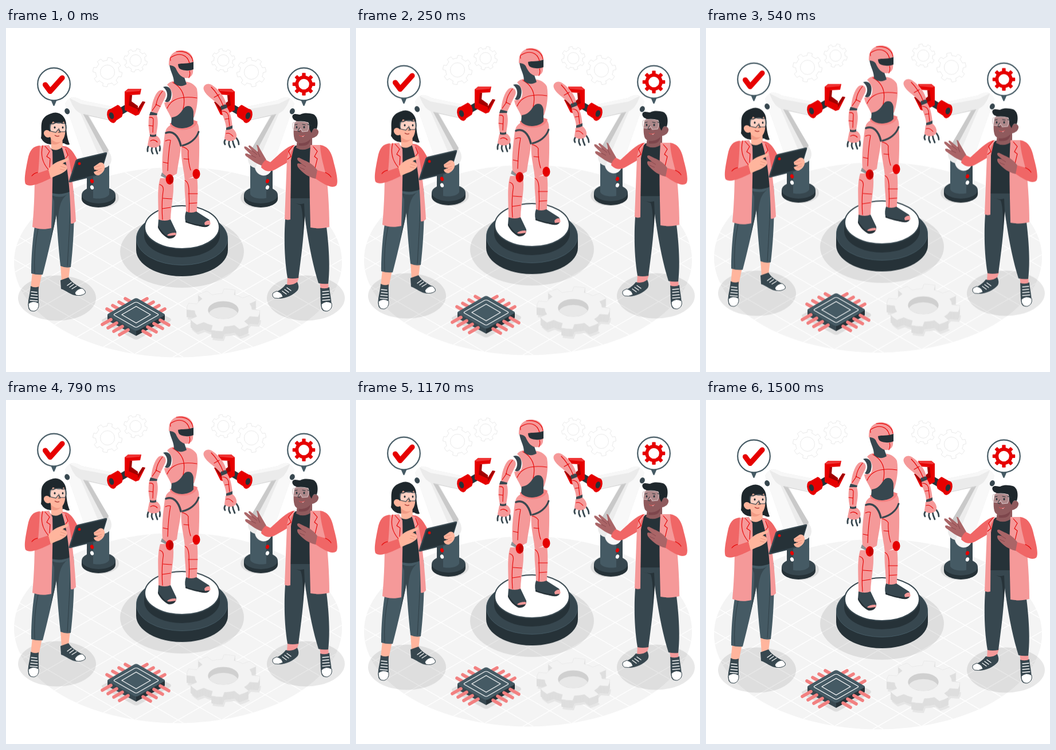
These frames come from a looping animation (600x600 px, 1540 ms). An HTML page:

```html
<!DOCTYPE html>
<html lang="en">
<head>
<meta charset="utf-8">
<title>Robot workshop</title>
<style>
html, body { margin: 0; width: 100%; height: 100%; overflow: hidden; background: #fff; }
svg { display: block; width: 100%; height: 100%; }
#scene { animation: float 1540ms -5ms infinite steps(18, end); }
@keyframes float {
  0% { transform: translateY(0); }
  48.649% { transform: translateY(-11.6px); }
  97.297% { transform: translateY(.4px); }
  97.298%, 100% { transform: translateY(0); }
}
.ink { fill: #263238; } .slate { fill: #37474f; } .steel { fill: #455a64; }
.red { fill: #e60000; } .deep { fill: #a10000; }
.pink { fill: #f59999; } .coral { fill: #f06666; }
.skin { fill: #ffb59d; } .brown { fill: #8f5a5d; } .hand { fill: #aa6567; }
.white { fill: #fff; } .shade { fill: #000; fill-opacity: .09; }
.line { fill: none; stroke: #e60000; stroke-width: 1.1; stroke-linecap: round; }
.dark { fill: none; stroke: #263238; stroke-linecap: round; stroke-linejoin: round; }
.joint { fill: none; stroke: #37474f; stroke-width: 2.8; stroke-linecap: round; }
.lace { fill: none; stroke: #fff; stroke-width: 1.3; stroke-linecap: round; }
.fold { fill: none; stroke: #263238; stroke-width: 1; opacity: .65; }
.pins { fill: none; stroke: #f28080; stroke-width: 5.6; stroke-linecap: round; }
.ghost { fill: #fff; stroke: #e9e9e9; stroke-width: 1; }
</style>
</head>
<body>
<svg viewBox="0 0 600 600">
<defs>
  <pattern id="grid" width="76" height="44" patternUnits="userSpaceOnUse" x="300" y="437">
    <path d="M0 0L76 44M76 0L0 44" stroke="#fff" stroke-width="1.4"/>
  </pattern>
  <g id="arm">
    <ellipse class="shade" cx="164" cy="296" rx="33" ry="18"/>
    <path class="ink" d="M132 291v7a29.500 15 0 0 0 59 0v-7z"/>
    <ellipse class="slate" cx="161.500" cy="291" rx="29.500" ry="15"/>
    <path class="steel" d="M141 232C141 221 180 221 180 232V290C176 300 145 300 141 290Z"/>
    <path class="slate" d="M141 232C142 226 147 224 152 224V297C147 296 143 294 141 290Z"/>
    <ellipse class="red" cx="150" cy="267" rx="3" ry="3.800" transform="rotate(-20 150 267)"/>
    <ellipse class="white" cx="150" cy="278" rx="3" ry="3.800" transform="rotate(-20 150 278)"/>
    <path d="M103 132C109 120 122 119 130 126L182 220C187 231 182 242 172 244C168 262 146 261 143 246Z" fill="#ececec"/>
    <path d="M103 132C107 123 112 121 118 121L171 244C166 260 146 261 143 246Z" fill="#f8f8f8"/>
    <path d="M133 147L141 149L179 213L174 224Z" fill="#c9c9c9"/>
    <path d="M111 123C116 119 123 121 132 126L185 137L186 161L134 150C125 148 118 142 111 123Z" fill="#ebebeb"/>
    <path d="M112 123C117 119 123 121 132 126L185 137L184 142L130 132Z" fill="#f7f7f7"/>
    <path d="M136 150L180 160L186 155L180 161L134 151Z" fill="#d5d5d5"/>
    <ellipse class="slate" cx="106.500" cy="145.500" rx="4.300" ry="5.300" transform="rotate(-25 106 145)"/>
    <path class="ink" d="M194 142L211 132L218 142L199 153Z"/>
    <path class="red" d="M181 142L195 134C202 137 206 147 202 155L187 165Z"/>
    <ellipse class="red" cx="184.500" cy="153.500" rx="7.800" ry="12.500" transform="rotate(-18 184.500 153.500)"/>
    <ellipse class="ink" cx="184" cy="153" rx="4" ry="6" transform="rotate(-18 184 153)"/>
    <path class="red" d="M207 111L213 106L236 106L234 116L216 117L216 133L230 140L238 128L243 129L232 151L226 153L207 143Z"/>
    <path class="deep" d="M216 117L220 117L219 128L230 136L230 142L214 135ZM230 141L238 128L243 129L230 147Z"/>
    <path d="M207 111L213 106L236 106L233 110L211 112Z" fill="#f03434"/>
  </g>
  <g id="shell">
    <circle cx="0" cy="0" r="28.300" fill="#fff" stroke="#455a64" stroke-width="2.200"/>
    <path class="steel" d="M-5.500 27Q0 29.500 5.500 27L1.200 37Q0 39-1.200 37Z"/>
  </g>
</defs>

<g id="scene">
  <!-- floor -->
  <ellipse cx="300" cy="408.500" rx="286" ry="166" fill="#f4f4f4"/>
  <ellipse cx="300" cy="408.500" rx="286" ry="166" fill="url(#grid)"/>
  <g id="ghosts" class="ghost"></g>
  <g class="shade">
    <ellipse cx="89" cy="471" rx="68" ry="39.500"/>
    <ellipse cx="523" cy="471" rx="68" ry="39.500"/>
    <ellipse cx="307" cy="390" rx="108" ry="63"/>
    <path d="M167 509L222 478Q227 475 232 478L286 506Q290 509 286 512L232 542Q227 545 222 542L168 513Z"/>
  </g>

  <use href="#arm"/>
  <use href="#arm" transform="translate(606) scale(-1 1)"/>

  <!-- platform -->
  <path class="ink" d="M227 367V387A80 46 0 0 0 387 387V367Z"/>
  <ellipse class="slate" cx="307" cy="367" rx="79.500" ry="46.500" stroke="#455a64"/>
  <path class="ink" d="M241 348V362A66 38 0 0 0 373 362V348Z"/>
  <ellipse class="white" cx="307" cy="347.500" rx="65" ry="37.500" stroke="#37474f" stroke-width="2"/>

  <!-- chip -->
  <path class="pins" d="M176 490l14 8M186 484l14 8M197 478l14 8M208 472l14 8M277 490l-14 8M267 484l-14 8M257 478l-14 8M246 472l-14 8"/>
  <path class="slate" d="M177 500V508Q177 510 179 511L227 537V520Z"/>
  <path class="ink" d="M277 500V508Q277 510 275 511L227 537V520Z"/>
  <path class="pins" d="M168 517l15-8.500M178 523l15-8.500M188 529l15-8.500M198 535l15-8.500M284 518l-15-8.500M273 524l-15-8.500M262 530l-15-8.500M252 536l-13-7.500"/>
  <path class="steel" d="M179 498L223 472.500Q227 470 231 472.500L275 498Q279 500 275 502L231 527Q227 529 223 527L179 502Q175 500 179 498Z"/>
  <path d="M189 499L224 479Q227 477.500 230 479L265 499Q266.500 500 265 501L230 521Q227 523 224 521L189 501Q187.500 500 189 499ZM202 500L227 485.500L252 500L227 514.500Z" fill="none" stroke="#fff" stroke-width="1.100"/>

  <g id="cog"></g>

  <!-- robot legs -->
  <path class="pink" d="M312 264C310 282 314 300 314 323L333 323C333 303 336 280 333 260Z"/>
  <path class="pink" d="M306 200C304 220 308 238 310 251L336 250C337 230 338 200 336 180Z"/>
  <path class="pink" d="M310 250L327 249L327 259L312 266Z"/>
  <ellipse class="red" cx="332" cy="254.500" rx="6.500" ry="8.700"/>
  <path class="slate" d="M314 320Q323 324 332 320L354 334C358 340 356 347 346 347C333 345 321 341 313 337Q311 328 314 320Z"/>
  <path class="pink" d="M346 340Q350 335 355 336Q358 341 355 344L347 344Z"/>
  <path class="ink" d="M313 336C323 341 334 343 346 344L355 343Q353 348 344 347C333 345 321 342 313 339Z"/>
  <path class="pink" d="M269 262C263 280 266 308 266 336L287 336C287 310 295 287 291 262Z"/>
  <path class="pink" d="M277 184C274 208 271 232 273 253L282 263L298 254C300 236 305 218 305 202L296 182Z"/>
  <path class="ink" d="M272 252L283 262L282 264L270 258Z" opacity=".5"/>
  <ellipse class="red" cx="285.500" cy="264" rx="6.800" ry="9"/>
  <ellipse cx="288" cy="264" rx="4" ry="7" fill="#c40000"/>
  <path class="slate" d="M266 334Q277 338 287 334L297 355C298 363 292 367 283 366C275 362 268 353 265 347Z"/>
  <path class="pink" d="M281 362Q283 357 296 357Q298 362 294 364Z"/>
  <path class="ink" d="M265 345C272 354 275 360 283 363L296 361Q293 368 283 367C275 363 268 355 265 348Z"/>
  <path class="line" d="M278 197Q284 194 287 196Q283 216 282 249M274 234L283 236M268 273Q276 275 274 285Q271 306 273 334M274 297L289 298M273 315L287 313M307 207Q315 209 318 214Q317 232 322 248M310 228L319 229M312 266Q320 269 319 290Q320 307 319 321M318 289L334 289M319 306L333 305"/>

  <!-- robot body -->
  <path class="pink" d="M286 170C279 174 277 181 278 187C290 190 300 196 305 207C312 207 329 199 336 182C338 174 335 166 331 162Z"/>
  <path class="joint" d="M279 183C291 178 301 188 305 205" style="stroke-width:3.500"/>
  <path class="joint" d="M308 205C320 202 332 194 336 181" style="stroke-width:3"/>
  <path d="M286 166C284 181 330 183 334 163L326 160Z" fill="#f58080"/>
  <path class="pink" d="M281 99C285 93 296 90 303 94C316 91 329 97 333 106C336 122 333 141 328 156L289 160C286 149 277 140 276 130L287 128C293 118 290 108 281 99Z"/>
  <path class="slate" d="M289 156C299 155 305 148 309 141C314 134 325 133 327 146V167C319 177 296 178 288 167Z"/>
  <path class="slate" d="M274 103C284 99 291 108 288 121C287 128 282 131 277 128C283 120 283 110 274 103Z"/>
  <path class="line" d="M291 95C309 105 314 120 309 141M281 140C289 121 312 119 333 122"/>

  <!-- robot head -->
  <path class="slate" d="M285 63C286 76 293 83 293 96C300 103 309 102 315 98L311 86L300 62Z"/>
  <path class="pink" d="M284 65C283 47 293 39 306 39C320 39 328 49 327 62L326 78C324 87 315 89 309 86C301 82 298 74 296 70C293 66 288 65 284 65Z"/>
  <path class="ink" d="M300 63C307 61 317 63 327 59V72C318 76 306 74 302 70Q300 67 300 63Z"/>
  <path class="line" d="M288 51C302 42 316 46 320 61M297 41C313 39 324 46 326 58M287 57Q286 51 288 51M320 75Q322 81 319 87"/>

  <!-- robot arms -->
  <path class="pink" d="M266 110C273 105 281 111 278 120L264 149L253 147C254 132 259 116 266 110Z"/>
  <path class="slate" d="M252 146L264 149L263 153L250 152Z"/>
  <path class="pink" d="M250 152H263C267 165 263 178 262 187H251C248 173 248 161 250 152Z"/>
  <path class="joint" d="M252 203Q246 206 247 215M256 206Q252 213 256 219M261 206Q261 213 264 219M266 202Q270 207 268 214"/>
  <path class="pink" d="M250 189L263 188C270 193 271 200 268 205C261 211 250 209 247 204Z"/>
  <path class="slate" d="M251 185Q256 188 262 185V189Q256 191 251 189Z"/>
  <path class="line" d="M273 110Q263 122 262 134L255 144M261 133L269 137M250 156Q257 155 257 160L256 182M249 170L256 171M252 197Q258 193 264 199"/>
  <path class="pink" d="M345 108C342 99 353 94 360 100C373 109 382 121 384 133L374 138C365 126 349 119 345 108Z"/>
  <path class="slate" d="M374 137Q380 132 385 134L386 140L376 143Z"/>
  <path class="pink" d="M376 143L386 139C393 151 394 164 395 172L384 175C384 164 377 154 376 143Z"/>
  <path class="joint" d="M384 193Q379 198 382 203M390 195Q387 202 391 208M395 195Q396 202 399 208M400 190Q406 196 406 203"/>
  <path class="pink" d="M383 178L395 175C401 180 404 187 401 193C395 199 385 198 381 193Z"/>
  <path class="slate" d="M384 174L395 170V175Q389 178 384 178Z"/>
  <path class="line" d="M358 103Q371 116 379 136M363 121L372 116M377 145Q386 145 388 153L390 171M382 159L389 158M384 184Q390 182 396 189"/>

  <!-- woman -->
  <path class="skin" d="M46 425L63 427L57 456L43 455ZM95 412L112 414L109 438L97 443Z"/>
  <path class="slate" d="M43 450Q50 454 57 451C56 467 59 479 55 488C51 496 41 496 39 488C37 477 42 465 43 450Z"/>
  <path class="white" d="M39 481Q47 474 57 480Q58 492 49 494Q39 495 39 481Z" stroke="#37474f"/>
  <path class="lace" d="M44 460l10 1M44 465l11 1M43 470l12 1M42 475l13 1"/>
  <path class="slate" d="M95 440L109 435C115 446 129 451 138 458C140 464 133 467 124 467C113 466 105 458 96 455Z"/>
  <path class="white" d="M120 462Q125 454 133 454Q140 459 138 463Q131 468 122 466Z" stroke="#37474f"/>
  <path class="lace" d="M107 449l7-5M111 452l7-5M115 455l8-5"/>
  <path class="steel" d="M79 286L118 284C120 325 118 374 113 417Q104 419 95 415C92 387 89 352 88 325C81 360 72 400 64 430Q53 431 44 428C44 396 47 365 50 346Z"/>
  <path class="slate" d="M80 292Q97 298 107 290C95 300 92 310 90 346L88 325C86 337 82 354 76 378C82 349 85 320 84 302Z"/>
  <path class="fold" d="M113 291Q112 330 107 415M56 350Q48 388 50 428"/>
  <path d="M61 192C63 182 60 172 63 162C68 151 77 150 82 148C93 145 104 154 105 167C105 183 107 193 111 203Q107 205 101 201L78 203Q67 203 61 192Z" fill="#1e272c"/>
  <path class="ink" d="M77 210L97 207C106 222 110 250 112 285Q97 292 80 288Z"/>
  <path class="skin" d="M78 188H98L99 207Q89 216 79 211Z"/>
  <path d="M79 194L96 198Q88 206 79 202Z" fill="#f29c86"/>
  <path class="skin" d="M77 181C71 174 63 180 67 187Q71 193 77 190C80 199 94 203 99 195C104 189 105 174 101 163C94 170 86 166 82 163C78 168 78 174 77 181Z"/>
  <path d="M77 168Q91 162 104 167Q107 174 103 181L94 181L91 177L87 182L78 180Q75 174 77 168Z" fill="#fff" fill-opacity=".4" stroke="#37474f" stroke-width="1.200"/>
  <path class="dark" d="M81 168l5-2M96 166l4 1M92 175l3 7l-4 0" stroke-width="1"/>
  <ellipse class="ink" cx="85" cy="173.500" rx="1.500" ry="2"/><ellipse class="ink" cx="99" cy="173.500" rx="1.400" ry="2"/>
  <path d="M85 187Q89 190 93 188" fill="none" stroke="#a5322e" stroke-width="1.200"/>
  <path class="coral" d="M98 206C112 205 119 219 126 232L121 255L111 251Z"/>
  <path class="pink" d="M97 206L106 211C113 235 119 285 122 337Q118 342 113 341C112 298 111 249 97 206Z"/>
  <path class="pink" d="M75 204L81 215C82 240 81 290 79 349C67 352 55 351 46 347C49 315 50 285 50 255L56 206Z"/>
  <path class="coral" d="M59 205C47 206 41 213 38 229C34 249 31 265 34 272C41 279 60 271 78 262L74 247L56 253C58 236 58 219 59 205Z"/>
  <path class="line" d="M68 206L76 215L71 224L77 228L76 243M104 211L108 222L104 227M55 252Q49 253 45 258M64 205Q58 229 74 247"/>
  <path class="slate" d="M126 228L173 217Q177 216 176 220L166 253Q165 256 161 257L113 269Q108 270 110 266L121 232Q122 229 126 228Z"/>
  <path class="ink" d="M127 230L172 219.500Q175 219 174 222L165 251Q164 254 160 255L116 266Q112 267 113 264L123 234Q124 231 127 230Z"/>
  <circle class="red" cx="128" cy="236.500" r="2.500"/>
  <path class="skin" d="M74 247C80 238 87 234 96 231L107 227Q111 228 107 232L99 236L105 239Q108 244 105 248C98 255 89 256 78 262Z"/>
  <path d="M98 237l7 3M95 241l9 3M94 246l8 2" fill="none" stroke="#eb9481" stroke-width="1"/>
  <path class="skin" d="M153 242L163 235Q170 233 172 241C173 249 168 253 162 257Q154 257 153 251L161 248L154 247Z"/>
  <path d="M155 243l10-3M157 248l10-3M159 252l8-3" fill="none" stroke="#eb9481" stroke-width="1"/>

  <!-- man -->
  <path class="pink" d="M491 434L511 434L507 447L490 450ZM547 443L562 443L563 456L549 457Z"/>
  <path class="slate" d="M488 447Q499 450 508 443Q512 451 509 457C502 465 490 472 475 472C467 472 463 468 466 463C475 459 483 454 488 447Z"/>
  <path class="white" d="M466 462L472 459Q481 461 483 469Q475 473 468 471Q463 467 466 462Z" stroke="#37474f"/>
  <path class="lace" d="M490 453l7 5M486 456l7 5M482 459l7 5"/>
  <path class="slate" d="M548 453Q557 456 564 452C565 466 569 477 567 486C564 496 552 497 550 488C548 477 549 466 548 453Z"/>
  <path class="white" d="M550 482Q558 474 568 480Q570 491 560 494Q550 494 550 482Z" stroke="#37474f"/>
  <path class="lace" d="M552 460l11-1M552 465l11-1M552 470l12-1M552 475l13-1"/>
  <path class="slate" d="M496 294H534L559 347C564 387 565 420 562 446Q553 447 545 445C534 410 527 371 521 328C519 370 514 405 510 436Q499 438 491 436C485 400 485 362 487 333Z"/>
  <path class="ink" d="M500 304Q510 309 520 306L521 330L517 365C519 335 517 317 514 309Z"/>
  <path class="ink" d="M497 213L505 205H531L535 297H496Z"/>
  <path class="brown" d="M509 190H534V206Q520 217 506 209Z"/>
  <path d="M511 200Q522 202 531 194Q529 208 510 205Z" fill="#7d464c"/>
  <path class="brown" d="M503 166C501 179 501 189 504 196C510 204 524 202 532 192C539 193 546 186 545 180C543 174 537 174 534 179L535 163L510 158Z"/>
  <path d="M500 152C503 148 509 151 513 151C521 147 530 149 535 150C544 153 545 166 542 176C536 173 534 180 533 183C527 176 530 168 526 164C518 164 508 164 502 160Q498 156 500 152Z" fill="#1e272c"/>
  <path d="M501 165Q514 161 527 165Q530 172 526 180L517 181L514 176L510 179L502 178Q498 172 501 165Z" fill="#fff" fill-opacity=".28" stroke="#d9c4c6" stroke-width="1.100"/>
  <path class="dark" d="M504 169l4-1M517 168l5 1M512 174l-3 6l4 1M526 168l7 2" stroke-width="1"/>
  <ellipse class="ink" cx="507" cy="173" rx="1.400" ry="2"/><ellipse class="ink" cx="520" cy="173" rx="1.500" ry="2"/>
  <path d="M513 187Q517 190 521 187L518 190Z" fill="#fff"/><path d="M511 187Q516 191 521 187" fill="none" stroke="#e65050"/>
  <path class="hand" d="M450 241C439 239 428 230 418 223Q415 218 421 219L428 222L416 210Q414 205 419 207L429 214L423 207Q423 203 427 206L439 216Q439 209 437 204Q439 202 443 211L454 230Z"/>
  <path d="M428 222l8 4M429 214l9 7M439 216l4 9" fill="none" stroke="#89494f"/>
  <path class="coral" d="M503 204C489 206 475 222 461 234L453 230Q446 236 445 243C453 252 463 251 471 246L497 231Z"/>
  <path class="pink" d="M505 203L497 217L496 334Q490 336 486 333L490 230C492 217 496 207 505 203Z"/>
  <path class="pink" d="M531 204L548 204L558 245C562 284 564 318 564 347C553 350 541 350 531 348C530 302 528 247 531 204Z"/>
  <path class="coral" d="M548 204C561 206 568 215 572 236C577 254 580 270 576 275C568 281 554 272 539 262L543 248L557 252C553 236 548 219 548 204Z"/>
  <path class="line" d="M501 205L493 215L497 224L491 229M536 207L543 215L538 224L543 228L535 261M557 252Q564 255 567 260"/>
  <path class="hand" d="M543 248C536 238 528 234 521 231L511 226Q506 226 509 231L516 237L509 236Q506 239 511 245C520 255 528 260 540 263Z"/>
  <path d="M515 237l8 5M512 243l9 4" fill="none" stroke="#89494f"/>

  <!-- bubbles -->
  <use href="#shell" x="83.500" y="98"/>
  <path d="M68.500 99L77 110.500L98 87" fill="none" stroke="#e60000" stroke-width="9.200" stroke-linecap="round" stroke-linejoin="round"/>
  <use href="#shell" x="519.500" y="98"/>
  <g id="badge" class="red"></g>
</g>
</svg>
<script>
const $ = id => document.getElementById(id);

// Toothed ring around the origin: root, tip and hole radius, rotation in degrees
function gear(root, tip, hole, turn, teeth = 8, wide = .27, slim = .2) {
  const step = 2 * Math.PI / teeth, start = turn * Math.PI / 180;
  const at = (r, a) => `${(r * Math.cos(a)).toFixed(2)} ${(r * Math.sin(a)).toFixed(2)}`;
  let d = '';
  for (let i = 0; i < teeth; i++) {
    const a = start + i * step, w = wide * step, s = slim * step;
    d += `${i ? 'L' : 'M'}${at(root, a - w)}L${at(tip, a - s)}A${tip} ${tip} 0 0 1 ${at(tip, a + s)}` +
      `L${at(root, a + w)}A${root} ${root} 0 0 1 ${at(root, a + step - w)}`;
  }
  return `${d}ZM${hole} 0A${hole} ${hole} 0 1 0 ${-hole} 0A${hole} ${hole} 0 1 0 ${hole} 0Z`;
}

const put = (d, x, y, rest = '') =>
  `<path d="${d}" transform="translate(${x} ${y})${rest}" fill-rule="evenodd"/>`;

const big = gear(20.5, 25.5, 12.5, 10), small = gear(16.5, 20.5, 10, 14);
$('ghosts').innerHTML = put(big, 177, 77) + put(small, 226, 56.5) +
  put(big, 428, 77, 'scale(-1 1)') + put(small, 379, 56.5, 'scale(-1 1)');

$('badge').innerHTML = put(gear(15.2, 19.8, 9.3, 0), 519.5, 98);

const cog = gear(50, 64, 26.5, 10), flat = 'scale(1 .577)';
let stack = `<g fill="#e6e6e6">${put(cog, 381, 509, flat)}</g><g fill="#dedede">`;
for (let y = 505; y > 492; y -= 1.5) stack += put(cog, 379, y, flat);
$('cog').innerHTML = stack + `</g><g fill="#f3f3f3" stroke="#e4e4e4" stroke-width=".8">${put(cog, 379, 492, flat)}</g>` +
  '<ellipse cx="379" cy="492" rx="26.5" ry="15.3" fill="#d0d0d0"/>' +
  '<path d="M354 497A26.500 15.300 0 0 1 404 497A26.500 15.300 0 0 1 354 497Z" fill="#e8e8e8"/>';
</script>
</body>
</html>
```
